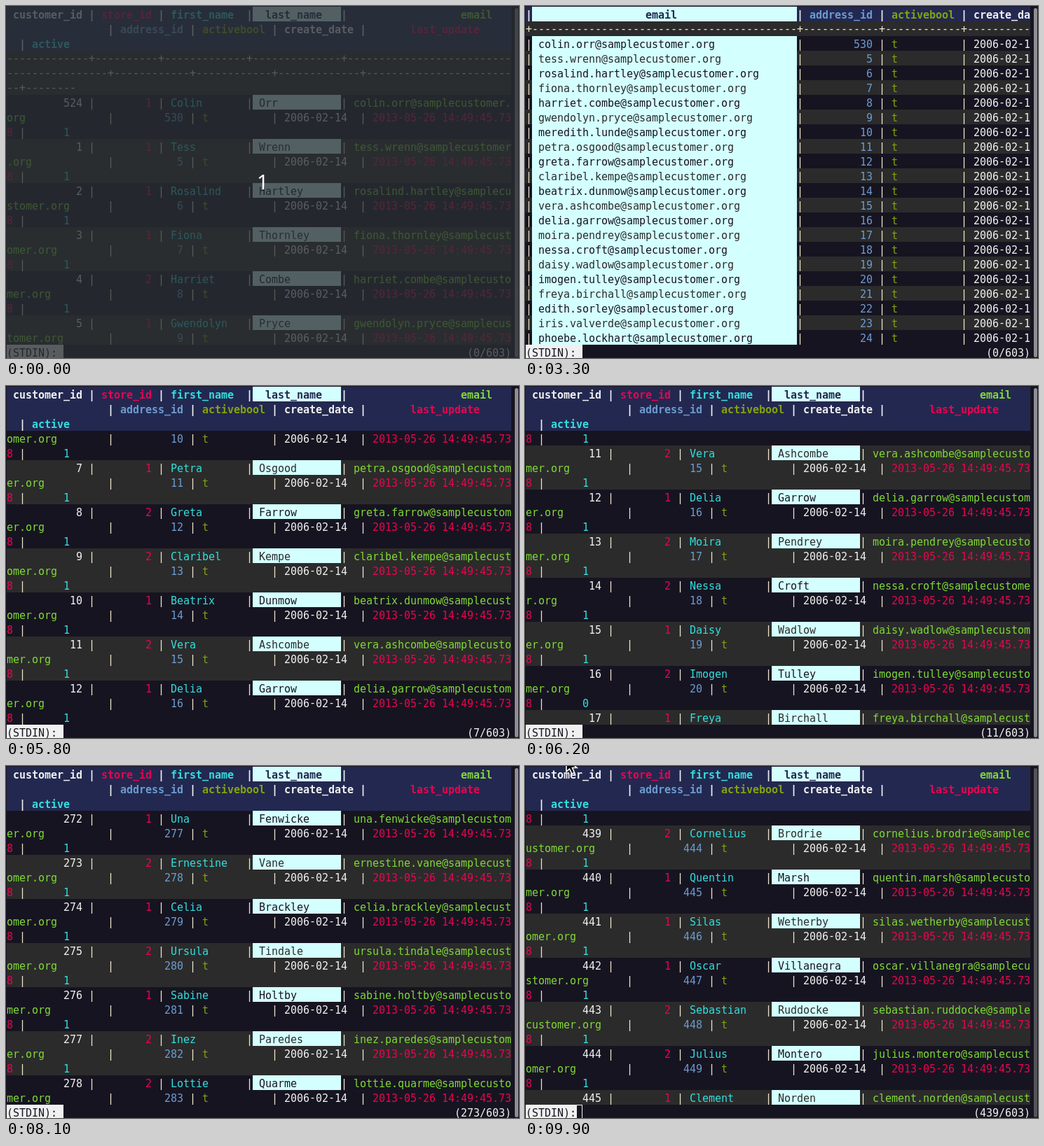
An HTML page with a canvas for the animation above (10 s loop, 732 by 503 pixels).

```html
<!DOCTYPE html>
<html lang="en">
<head>
<meta charset="utf-8">
<title>Terminal pager</title>
<style>
html, body { margin: 0; width: 100%; height: 100%; overflow: hidden; background: #171421; }
canvas { display: block; }
</style>
</head>
<body>
<canvas id="stage" width="732" height="503"></canvas>
<script>
const ctx = document.getElementById('stage').getContext('2d');
const LOOP = 10000, STEP = 100;
const COLS = 80, CW = 9, RH = 21, PAD = 1, BASELINE = 17, STATUS_ROW = 23;
const DARK = '#171421', GREY = '#2b2b2b', NAVY = '#232850', LIGHT = '#f0f0f0', PICK = '#d4ffff';
const RULE = '#f0e6cc', PINK = '#e8054f', AQUA = '#34dede';
const FONT = '15px "DejaVu Sans Mono", "Noto Sans Mono", monospace';

// name, width, colour, right aligned
const columns = [
  ['customer_id', 13, LIGHT, true],
  ['store_id', 10, PINK, true],
  ['first_name', 13, AQUA],
  ['last_name', 14, '#eda57c'],
  ['email', 42, '#80d936'],
  ['address_id', 12, '#6c9bd0', true],
  ['activebool', 12, '#83a30c'],
  ['create_date', 13, LIGHT],
  ['last_update', 25, PINK],
  ['active', 8, AQUA, true]
].map(([name, width, color, right]) => ({ name, width, color, right }));

let end = 0;
for (const c of columns) {
  c.start = end;
  end += c.width + 1;
}
const colAt = i => columns.findIndex(c => i >= c.start && i < c.start + c.width);

const people = {
  1: 'Tess Wrenn,Rosalind Hartley,Fiona Thornley,Harriet Combe,Gwendolyn Pryce,Meredith Lunde,Petra Osgood,' +
     'Greta Farrow,Claribel Kempe,Beatrix Dunmow,Vera Ashcombe,Delia Garrow,Moira Pendrey,Nessa Croft,' +
     'Daisy Wadlow,Imogen Tulley,Freya Birchall,Edith Sorley,Iris Valverde,Phoebe Lockhart',
  272: 'Una Fenwicke,Ernestine Vane,Celia Brackley,Ursula Tindale,Sabine Holtby,Inez Paredes,Lottie Quarme',
  439: 'Cornelius Brodrie,Quentin Marsh,Silas Wetherby,Oscar Villanegra,Sebastian Ruddocke,Julius Montero,Clement Norden',
  524: 'Colin Orr'
};
const stores = { 1: '11121212212122121212', 272: '1212122', 439: '2111221', 524: '1' };

const byId = {}, storeOf = {};
for (const first in people)
  people[first].split(',').forEach((name, i) => {
    byId[+first + i] = name.split(' ');
    storeOf[+first + i] = stores[first][i];
  });
const pool = Object.values(byId);

function customer(id) {
  const [first, last] = byId[id] || [pool[id * 7 % pool.length][0], pool[id * 11 % 34][1]];
  const address = id + (id < 250 ? 4 : id < 500 ? 5 : 6);
  return [id, storeOf[id] || 1 + id * 5 % 3 % 2, first, last,
    `${first}.${last}@samplecustomer.org`.toLowerCase(),
    address, 't', '2006-02-14', '2013-05-26 14:49:45.738', id === 16 ? 0 : 1];
}

function center(text, width) {
  return text.padStart(text.length + Math.floor((width - text.length) / 2)).padEnd(width);
}

// Line 0 is the header, line 1 the rule, line 2 customer 524, then the rest by id.
function lineText(n) {
  if (n === 0) return columns.map(c => center(c.name, c.width)).join('|');
  if (n === 1) return columns.map(c => '-'.repeat(c.width)).join('+');
  const id = n === 2 ? 524 : n - 2 < 524 ? n - 2 : n - 1;
  return customer(id).map((v, i) => {
    const { width, right } = columns[i];
    return right ? (v + ' ').padStart(width) : (' ' + v).padEnd(width);
  }).join('|').trimEnd();
}

// Latest value whose start time has been reached
const at = (t, ...keys) => keys.filter(k => k[0] <= t).pop()[1];

function scrollAt(t) {
  if (t < 5300) return at(t, [0, 0], [4700, 1], [4800, 2]);
  if (t < 6500) return Math.min(39, 5 + Math.round((t - 5300) / 30));
  if (t < 7000) return 59;
  const presses = (Math.min(t, 8900) - 7000) / STEP + 1;
  return 59 + 20 * Math.round(presses * 3.15);
}

// Dashes and pluses sit on the middle of the capitals.
function glyph(ch, row, col, color) {
  if (ch === ' ') return;
  const lift = ch === '-' || ch === '+' ? 1 : 0;
  ctx.fillStyle = color;
  ctx.fillText(ch, PAD + col * CW, PAD + row * RH + BASELINE - lift);
}

function cells(row, col, count, color) {
  ctx.fillStyle = color;
  ctx.fillRect(PAD + col * CW, PAD + row * RH, count * CW, RH);
}

function drawLine(row, n, offset, selected) {
  const text = lineText(n);
  const back = n === 0 ? NAVY : n % 2 ? GREY : DARK;
  const rule = n === 0 ? LIGHT : RULE;
  cells(row, 0, COLS, back);
  ctx.font = (n === 0 ? 'bold ' : '') + FONT;
  for (let col = 0; col < COLS && offset + col < text.length; col++) {
    const c = n === 1 ? -1 : colAt(offset + col);
    const picked = c >= 0 && c === selected;
    if (picked) cells(row, col, 1, PICK);
    glyph(text[offset + col], row, col, picked ? back : c < 0 ? rule : columns[c].color);
  }
}

function drawStatus(t, scroll) {
  const message = at(t, [0, ''], [1800, 'Set WrapMode false'], [2400, ''], [3900, 'Set WrapMode true'], [4700, '']);
  const left = '(STDIN):' + message;
  const right = `(${Math.floor(scroll / 3)}/603)`;
  const cursor = at(t, [0, 'on'], [300, 'off'], [500, 'on'], [1700, 'off'], [1800, 'on'],
    [4400, 'off'], [4700, 'on'], [9500, 'hollow']);
  ctx.font = FONT;
  cells(STATUS_ROW, 0, left.length + (cursor === 'on'), LIGHT);
  [...left].forEach((ch, i) => glyph(ch, STATUS_ROW, i, DARK));
  [...right].forEach((ch, i) => glyph(ch, STATUS_ROW, COLS - right.length + i, LIGHT));
  if (cursor === 'hollow') {
    ctx.strokeStyle = LIGHT;
    ctx.lineWidth = 1;
    ctx.strokeRect(PAD + left.length * CW + 0.5, PAD + STATUS_ROW * RH + 0.5, CW - 1, RH - 1);
  }
}

function drawPointer(x, y) {
  ctx.save();
  ctx.translate(x, y);
  ctx.beginPath();
  [[0, 0], [0, 18], [4.5, 14], [8, 21], [11.5, 19.5], [8.5, 12.5], [15, 12.5]].forEach(p => ctx.lineTo(...p));
  ctx.closePath();
  ctx.fillStyle = '#000';
  ctx.fill();
  ctx.strokeStyle = '#fff';
  ctx.lineWidth = 1.6;
  ctx.stroke();
  ctx.restore();
}

function drawCountdown() {
  ctx.fillStyle = 'rgba(42, 46, 50, 0.76)';
  ctx.fillRect(0, 0, 732, 503);
  ctx.fillStyle = '#fff';
  ctx.font = '29px "Noto Sans", sans-serif';
  ctx.fillText('1', 358, 262);
}

function draw(t) {
  const selected = at(t, [0, 3], [500, 4], [1000, 6], [1100, 8], [1700, 9], [2400, 8],
    [2800, 7], [3000, 6], [3200, 5], [3300, 4], [3500, 3]);
  const wrapped = t < 1800 || t >= 3900;
  const scroll = scrollAt(t);
  ctx.fillStyle = DARK;
  ctx.fillRect(0, 0, 732, 503);
  for (let row = 0; row < STATUS_ROW; row++) {
    if (wrapped) {
      const pos = row < 3 ? row : row + scroll;
      drawLine(row, Math.floor(pos / 3), pos % 3 * COLS, selected);
    } else {
      drawLine(row, row, columns[selected].start - 1, selected);
    }
  }
  drawStatus(t, scroll);
  ctx.fillStyle = at(t, [0, '#8f8e94'], [9700, '#6c6b71'], [9900, '#55545a']);
  ctx.beginPath();
  ctx.roundRect(726, 3, 5, 499, 2.5);
  ctx.fill();
  if (t >= 9500) drawPointer(t < 9700 ? 69 : 59, -10);
  if (t < 100) drawCountdown();
}

const began = performance.now();
let shown = -1;
function tick() {
  const t = Math.floor((performance.now() - began) % LOOP / STEP) * STEP;
  if (t !== shown) draw(shown = t);
  requestAnimationFrame(tick);
}
tick();
</script>
</body>
</html>
```
